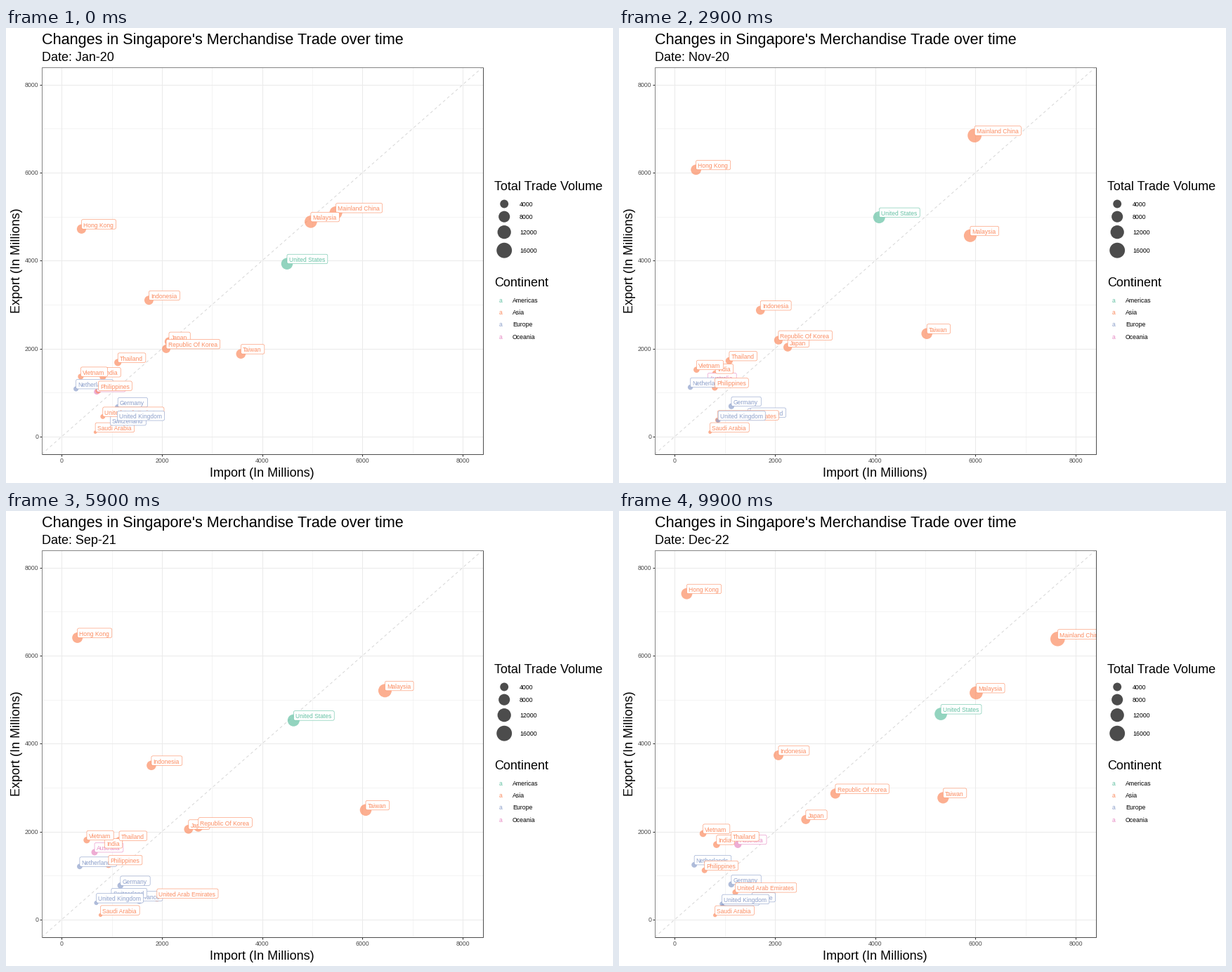
Animation, 864 px wide and 648 px high, one loop 10 s. Source, as a matplotlib script:

```python
import numpy as np
import matplotlib.pyplot as plt
from matplotlib.animation import FuncAnimation
from matplotlib.patches import Circle, FancyBboxPatch, Rectangle
from matplotlib.textpath import TextPath

W, H, FRAMES, STEP = 864, 648, 100, 100
LAST = FRAMES - 1
FONT = "Liberation Sans"
LABEL_SIZE, LABEL_PAD, LABEL_H = 8.5, 3.6, 13.5
MONTHS = "Jan Feb Mar Apr May Jun Jul Aug Sep Oct Nov Dec".split()
START, DAYS = np.datetime64("2020-01-01"), 1065
AMERICAS, ASIA, EUROPE, OCEANIA = "#66C2A5", "#FC8D62", "#8DA0CB", "#E78AC3"

plt.rcParams["font.family"] = FONT
rng = np.random.default_rng(7)
fig = plt.figure(figsize=(W / 72, H / 72), dpi=72, facecolor="white")
ax = fig.add_axes([0, 0, 1, 1])
ax.set_xlim(0, W)
ax.set_ylim(H, 0)
ax.axis("off")


def px(v):
    return 79.3 + 0.07134 * v


def py(v):
    return 581.9 - 0.06264 * v


def radius(volume):
    share = np.sqrt(np.clip((volume - 700) / 16300, 0, None))
    return 0.375 * ((1 + 9 * share) * 2.845 + 0.94) + 0.2


def write(x, y, s, size, color="black", ha="left", **kw):
    return ax.text(x, y, s, fontsize=size, color=color, ha=ha, va="baseline", **kw)


def line(x, y, color, lw, z=1, **kw):
    ax.plot(x, y, color=color, lw=lw, zorder=z, solid_capstyle="butt", **kw)


# Panel, grid and axes
LEFT, RIGHT, TOP, BOTTOM = px(-400), px(8400), py(8400), py(-400)
panel = ax.add_patch(Rectangle((LEFT, TOP), RIGHT - LEFT, BOTTOM - TOP, fc="none", ec="none"))
line([LEFT, LEFT, RIGHT], [BOTTOM, TOP, TOP], "#858585", 1, 60)
line([LEFT, RIGHT, RIGHT], [BOTTOM, BOTTOM, TOP], "#4D4D4D", 1, 60)
for v in range(0, 8001, 1000):
    lw = 0.53 if v % 2000 else 1.07
    line([px(v)] * 2, [TOP, BOTTOM], "#EBEBEB", lw)
    line([LEFT, RIGHT], [py(v)] * 2, "#EBEBEB", lw)
    if v % 2000 == 0:
        line([px(v)] * 2, [BOTTOM, BOTTOM + 2.75], "#333333", 1.07)
        line([LEFT - 2.75, LEFT], [py(v)] * 2, "#333333", 1.07)
        write(px(v), 619.2, str(v), 8.8, "#4D4D4D", "center")
        write(46, py(v) + 3.1, str(v), 8.8, "#4D4D4D", "right")
line([LEFT, RIGHT], [BOTTOM, TOP], "#D3D3D3", 0.9, 2, dashes=(4.4, 4.4))

# Titles
write(LEFT, 22.5, "Changes in Singapore's Merchandise Trade over time", 21.6)
date = write(LEFT, 46.8, "", 18)
write(364.5, 639, "Import (In Millions)", 18, ha="center")
ax.text(24, 331.5, "Export (In Millions)", fontsize=18, rotation=90, ha="right", va="center")

# Legends
write(694.7, 231.2, "Total Trade Volume", 18)
for volume, y in zip((4000, 8000, 12000, 16000), (250.5, 268.7, 290.7, 316.7)):
    ax.add_patch(Circle((709.2, y), radius(volume), fc="black", ec="none", alpha=0.7))
    write(731, y + 3.2, str(volume), 8.8)
write(694.7, 368, "Continent", 18)
for i, (name, color) in enumerate([("Americas", AMERICAS), ("Asia", ASIA),
                                   ("Europe", EUROPE), ("Oceania", OCEANIA)]):
    y = 390.8 + 17.28 * i
    write(703.7, y, "a", LABEL_SIZE, color, "center")
    write(721, y, name, 8.8)

# Shared trade cycle: dip in 2020, peak in mid 2022
n = np.arange(FRAMES)
cycle = np.interp(n, [0, 18, 40, 59, 72, 87, 99], [1, 0.9, 1.08, 1.03, 1.13, 1.25, 1])
month_ends = np.linspace(0, LAST, 36).round()


def track(times, values):
    """Pass through the values; in between follow the cycle with monthly unrest."""
    pulse = cycle * np.interp(n, month_ends, rng.uniform(0.98, 1.02, 36))
    return pulse * np.interp(n, times, values / pulse[times])


class Country:
    """A dot and its label, moving from start to end (import, export)."""
    z = 10

    def __init__(self, name, color, start, end, via={}, spans=((0, LAST),)):
        keys = {0: start, **via, LAST: end}
        imp, exp = (track(list(keys), v) for v in np.array(list(keys.values())).T)
        self.x, self.y, self.r = px(imp), py(exp), radius(imp + exp)
        self.spans = spans
        Country.z += 1
        width = TextPath((0, 0), name, size=LABEL_SIZE, prop={"family": FONT}).get_extents().width
        self.dot = ax.add_patch(Circle((0, 0), 1, fc=color, ec="none", alpha=0.7, zorder=5))
        self.box = ax.add_patch(FancyBboxPatch(
            (0, 0), width + 2 * LABEL_PAD + 0.6, LABEL_H, fc="white", ec=color, lw=0.58,
            boxstyle="round,pad=0,rounding_size=2.2", zorder=self.z))
        self.text = write(0, 0, name, LABEL_SIZE, color, zorder=self.z + 0.5, clip_on=True)
        self.parts = (self.dot, self.box, self.text)
        for part in self.parts:
            part.set_clip_path(panel)

    def show(self, i):
        x, y = self.x[i], self.y[i]
        self.dot.center = x, y
        self.dot.set_radius(self.r[i])
        self.box.set_x(x)
        self.box.set_y(y - LABEL_H)
        self.text.set_position((x + 2.6, y - 2.7))
        for part in self.parts:
            part.set_visible(any(a <= i <= b for a, b in self.spans))


# Alphabetical order is also the stacking order of the labels
countries = [
    Country("Australia", OCEANIA, (700, 1020), (1260, 1710), {87: (770, 2120)}),
    Country("France", EUROPE, (1480, 445), (1540, 400)),
    Country("Germany", EUROPE, (1120, 670), (1130, 800)),
    Country("Hong Kong", ASIA, (395, 4720), (240, 7410),
            {18: (510, 5060), 40: (310, 7480), 87: (420, 6360)}),
    Country("India", ASIA, (820, 1355), (835, 1705)),
    Country("Indonesia", ASIA, (1740, 3100), (2070, 3735),
            {18: (1580, 2395), 87: (2210, 4900)}),
    Country("Japan", ASIA, (2140, 2160), (2615, 2275), {87: (3215, 2315)}),
    # Left out while its trade lies beyond the scale
    Country("Mainland China", ASIA, (5470, 5090), (7640, 6380),
            {18: (5550, 6255), 40: (6290, 7275), 75: (7600, 7950)},
            spans=((0, 43), (75, 80), (93, LAST))),
    Country("Malaysia", ASIA, (4970, 4885), (6015, 5155),
            {18: (5085, 3985), 59: (6450, 5205)}),
    Country("Netherlands", EUROPE, (285, 1085), (390, 1245)),
    Country("Philippines", ASIA, (730, 1045), (595, 1120), {87: (1205, 1580)}),
    Country("Republic Of Korea", ASIA, (2085, 1995), (3205, 2865),
            {18: (1690, 2020), 87: (4020, 2410)}),
    Country("Saudi Arabia", ASIA, (670, 100), (805, 100)),
    Country("Switzerland", EUROPE, (970, 255), (975, 320),
            {40: (1880, 550), 59: (990, 495)}),
    Country("Taiwan", ASIA, (3575, 1880), (5355, 2770),
            {18: (4275, 2065), 72: (6965, 2800)}),
    Country("Thailand", ASIA, (1120, 1685), (1125, 1785)),
    Country("United Arab Emirates", ASIA, (820, 455), (1210, 620),
            {18: (455, 320), 59: (1900, 485)}),
    Country("United Kingdom", EUROPE, (1110, 365), (945, 355), {59: (690, 380)}),
    Country("United States", AMERICAS, (4495, 3930), (5310, 4675),
            {18: (3705, 5245), 40: (4465, 4530)}),
    Country("Vietnam", ASIA, (380, 1365), (565, 1955)),
]


def update(i):
    day = START + int(i * DAYS / LAST)
    month = int(day.astype("datetime64[M]").astype(int))
    date.set_text(f"Date: {MONTHS[month % 12]}-{month // 12 - 30}")
    for c in countries:
        c.show(i)
    return []


anim = FuncAnimation(fig, update, frames=FRAMES, interval=STEP, repeat=True,
                     repeat_delay=0, blit=False)
plt.show()
```
